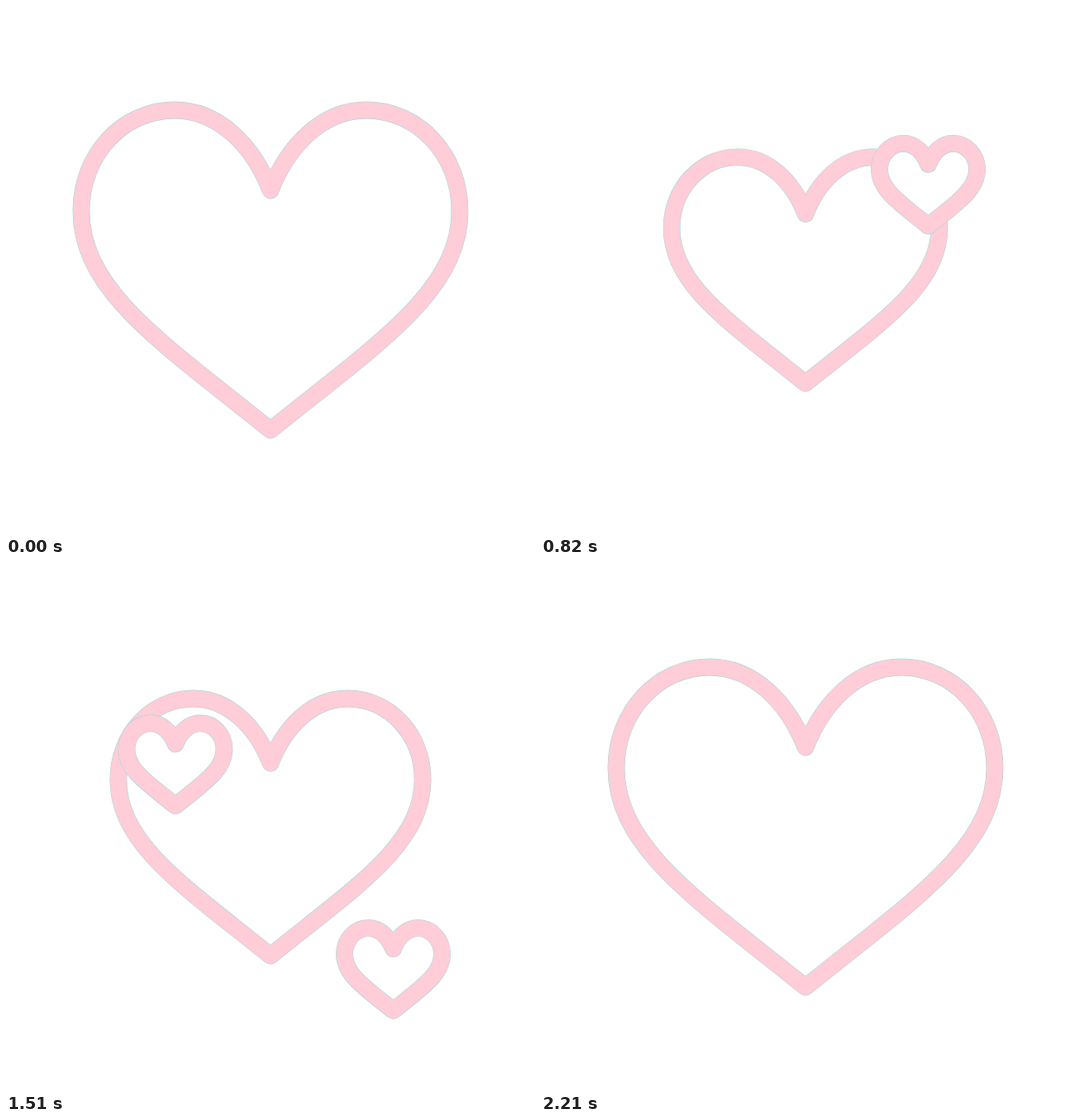
Animation of 640x640 px, one loop 2300 ms. Source, as an HTML page with a canvas:

```html
<!DOCTYPE html>
<html>
<head>
<meta charset="utf-8">
<style>
html, body { margin: 0; width: 100%; height: 100%; overflow: hidden; background: #fff; }
canvas { display: block; }
</style>
</head>
<body>
<canvas id="stage" width="640" height="640"></canvas>
<script>
const ctx = document.getElementById('stage').getContext('2d');
const LOOP = 2300, STEP = LOOP / 53;
const PINK = '#fecdd8', PALE = '#eee8dc', BEIGE = '#e8decb', RIM = '#8cd9dc';

const shape = new Path2D(
  'M0-97C22-153 64-194 116-194C179-194 229-140 229-72C229 25 130 88 0 193' +
  'C-130 88-229 25-229-72C-229-140-179-194-116-194C-64-194-22-153 0-97Z');

// The large heart shrinks to 70% and returns: start, length
const beats = [[230, 415], [645, 395], [1393, 417], [1810, 403]];

// Rising small hearts: centre x, start, length
const risers = [[205, 70.6, 640], [468.5, 364, 634], [205, 1013, 754], [468.5, 1372, 687]];

const smooth = u => u * u * (3 - 2 * u);

function heart(x, y, scale) {
  const path = new Path2D();
  path.addPath(shape, new DOMMatrix([scale, 0, 0, scale, x, y]));
  return path;
}

function stroke(path, color, width = 20) {
  ctx.strokeStyle = color;
  ctx.lineWidth = width;
  ctx.stroke(path);
}

// Pink line with a hairline rim
function outline(path) {
  stroke(path, RIM, 20.8);
  stroke(path, PINK);
}

function bigScale(t) {
  for (const [start, length] of beats) {
    const u = (t - start) / length;
    if (u > 0 && u < 1) return 1 - 0.3 * smooth(1 - Math.abs(2 * u - 1));
  }
  return 1;
}

function drawRiser(big, x, u) {
  const path = heart(x, 538 - 394 * smooth(u), 0.2576);
  if (u < 0.75) {
    ctx.fillStyle = '#fff';
    ctx.fill(path);
    if (u > 0.05) return outline(path);
  } else if (x < 320) {
    // the fading fill tints the line below it
    ctx.save();
    ctx.clip(path);
    stroke(big, BEIGE);
    ctx.restore();
  }
  stroke(path, u < 0.04 || u > 0.94 ? PALE : PINK);
}

function draw(now) {
  const t = Math.floor((now % LOOP + 10) / STEP) % 53 * STEP;
  ctx.fillStyle = '#fff';
  ctx.fillRect(0, 0, 640, 640);
  ctx.lineJoin = 'round';
  const big = heart(320, 320, bigScale(t));
  outline(big);
  for (const [x, start, length] of risers) {
    const u = (t - start) / length;
    if (u > 0.032 && u < 1) drawRiser(big, x, u);
  }
  requestAnimationFrame(draw);
}
requestAnimationFrame(draw);
</script>
</body>
</html>
```
